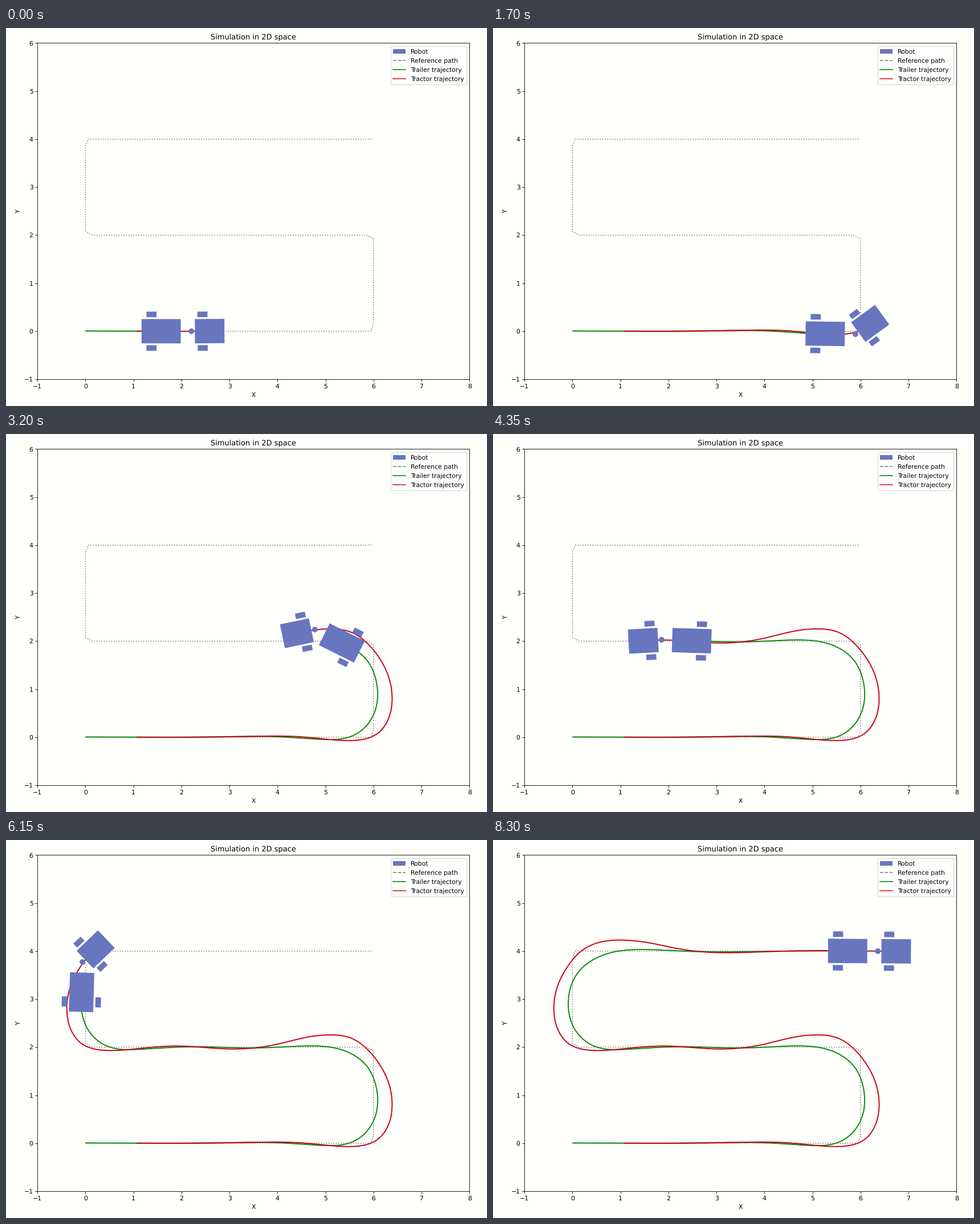
Animation, 844 px wide and 663 px high, one loop 8350 ms. Source, as a matplotlib script:

```python
import numpy as np
import matplotlib.pyplot as plt
from matplotlib.animation import FuncAnimation
from matplotlib.lines import Line2D
from matplotlib.patches import Circle, Patch, Polygon

W, H, DPI = 844, 663, 64
K = 78 / DPI  # keeps default point sizes at 78 dpi
BLUE, GREEN, RED, GRAY = "#6776bf", "#0a8a0a", "#cb0016", "#808080"
BG = "#fffffc"
HITCH, TRAILER_LEN = 0.233, 0.831

# The tractor's turn at the first corner, then how it settles on the next
# straight: distance from the corner, height above the line
TURN = [(4.04, 0.023), (4.52, 0.006), (4.99, -0.04), (5.515, -0.07),
        (5.823, -0.037), (6.081, 0.074), (6.31, 0.38), (6.387, 0.754),
        (6.316, 1.253), (6.084, 1.704), (5.865, 1.961)]
SETTLE = [(0.438, 0.175), (0.95, 0.255), (1.471, 0.19),
          (1.97, 0.068), (2.432, -0.011), (3.0, -0.038)]

# Frame and place of the tractor at changes of speed
STOPS = [(0, 2.44, 0), (17, 4.47, 0.02), (34, 6.081, 0.074), (51, 6.07, 1.727),
         (64, 4.55, 2.2), (68, 3.977, 2.05), (87, 1.624, 2.018),
         (102, 0.148, 1.975), (119, -0.23, 3.41), (123, 0.119, 3.918),
         (147, 3.918, 3.983), (152, 4.814, 4.008), (166, 6.595, 3.997)]

# Simulation steps within each run of 17 frames
RUN, STEPS = 17, [16, 16, 13, 13, 13, 14, 14, 14, 14, 14]
FRAMES = 167


def bend(stretch=1, swing=1):
    tail = [(6 - stretch * d, 2 + swing * h) for d, h in SETTLE]
    return np.array(TURN + tail)


def spline(points, count):
    """Natural cubic spline over chord length."""
    h = np.hypot(*np.diff(points, axis=0).T)
    t = np.r_[0, np.cumsum(h)]
    n = len(t)
    a, b = np.eye(n), np.zeros((n, 2))
    slope = np.diff(points, axis=0) / h[:, None]
    for i in range(1, n - 1):
        a[i, i - 1:i + 2] = h[i - 1], 2 * (h[i - 1] + h[i]), h[i]
        b[i] = 6 * (slope[i] - slope[i - 1])
    m = np.linalg.solve(a, b)
    u = np.linspace(0, t[-1], count)
    i = np.clip(np.searchsorted(t, u) - 1, 0, n - 2)
    d, hi = (u - t[i])[:, None], h[i][:, None]
    lin = slope[i] - hi * (2 * m[i] + m[i + 1]) / 6
    return points[i] + d * lin + d**2 * m[i] / 2 + d**3 * (m[i + 1] - m[i]) / (6 * hi)


def monotone(x, y, q):
    """Monotone cubic interpolation."""
    h = np.diff(x)
    s = np.diff(y) / h
    k = np.r_[s[0], 2 * s[1:] * s[:-1] / (s[1:] + s[:-1]), s[-1]]
    i = np.clip(np.searchsorted(x, q) - 1, 0, len(h) - 1)
    r = (q - x[i]) / h[i]
    return (y[i] * (1 + 2 * r) * (1 - r)**2 + y[i + 1] * r**2 * (3 - 2 * r)
            + h[i] * r * (1 - r) * (k[i] * (1 - r) - k[i + 1] * r))


def unit(v):
    return v / np.linalg.norm(v, axis=-1, keepdims=True)


# Motion: the second bend mirrors the first, the hitch pulls the trailer
start = [(1.075, 0), (2.4, 0), (3.33, 0.014)]
end = [(3.92, 3.983), (4.87, 4.008), (6.595, 3.997), (6.9, 3.995)]
mirrored = bend(1.09, 0.9) * (-1, 1) + (6, 2)
tractor = spline(np.vstack([start, bend(), mirrored, end]), 4000)
heading = unit(np.gradient(tractor, axis=0))
hitch = tractor - HITCH * heading
trailer = np.empty_like(hitch)
pos = hitch[0] - TRAILER_LEN * heading[0]
for i, p in enumerate(hitch):
    pos = p - TRAILER_LEN * unit(p - pos)
    trailer[i] = pos
pull = unit(hitch - trailer)

rate = np.repeat(STEPS, RUN) / RUN
step = np.round(np.r_[0, np.cumsum(rate)])[:FRAMES]
stops = np.array(STOPS)
reached = np.array([np.argmin(np.hypot(*(tractor - p).T)) for p in stops[:, 1:]])
index = monotone(step[stops[:, 0].astype(int)], reached, step)
index = np.clip(np.round(index).astype(int), 0, len(tractor) - 1)

# Stage
plt.rcParams.update({
    "font.family": "DejaVu Sans", "font.size": 10 * K, "text.hinting": "none",
    "axes.linewidth": 0.8 * K, "axes.titlepad": 6 * K, "axes.labelpad": 4 * K,
    "lines.linewidth": 1.5 * K, "patch.linewidth": K,
})
for axis in "xtick", "ytick":
    for name, size in (("major.size", 3.5), ("major.pad", 3.5), ("major.width", 0.8)):
        plt.rcParams[f"{axis}.{name}"] = size * K

fig = plt.figure(figsize=(W / DPI, H / DPI), dpi=DPI, facecolor=BG)
ax = fig.add_axes([55.2 / W, 1 - 616 / H, 758.1 / W, 589.6 / H], facecolor=BG)
ax.set(xlim=(-1, 8), ylim=(-1, 6), xlabel="X", ylabel="Y",
       title="Simulation in 2D space")

ref = [(0, 0), (5.95, 0), (6, 0.15), (6, 1.92), (5.86, 2), (0.14, 2),
       (0, 2.08), (0, 3.85), (0.06, 4), (5.98, 4)]
ax.plot(*zip(*ref), ":", color=GRAY)
green, = ax.plot([], [], color=GREEN, lw=1.8 * K)
red, = ax.plot([], [], color=RED, lw=1.8 * K)


def box(x0, x1, y0, y1):
    return np.array([(x0, y0), (x1, y0), (x1, y1), (x0, y1)])


def vehicle(back, front):
    """Body and two wheels around the axle."""
    shapes = [box(back, front, -0.253, 0.253)]
    shapes += [box(-0.105, 0.105, y - 0.058, y + 0.058) for y in (-0.35, 0.35)]
    return [(s, ax.add_patch(Polygon(s, color=BLUE, lw=0, zorder=3))) for s in shapes]


def place(parts, at, d):
    turn = np.array([d, (-d[1], d[0])])
    for shape, patch in parts:
        patch.set_xy(at + shape @ turn)


rear = vehicle(-0.207, 0.61)
lead = vehicle(-0.16, 0.456)
pin = ax.add_patch(Circle((0, 0), 0.059, color=BLUE, lw=0, zorder=4))

ax.legend(loc="upper right", handles=[
    Patch(color=BLUE, lw=0, label="Robot"),
    Line2D([], [], color=GRAY, ls="--", label="Reference path"),
    Line2D([], [], color=GREEN, label="Trailer trajectory"),
    Line2D([], [], color="#e2201f", label="Tractor trajectory"),
])


def draw(frame):
    i = index[frame]
    green.set_data(*trailer[:i + 1].T)
    red.set_data(*tractor[:i + 1].T)
    place(rear, trailer[i], pull[i])
    place(lead, tractor[i], heading[i])
    pin.center = hitch[i]
    return []


anim = FuncAnimation(fig, draw, frames=FRAMES, interval=50,
                     repeat=True, repeat_delay=0)
plt.show()
```
